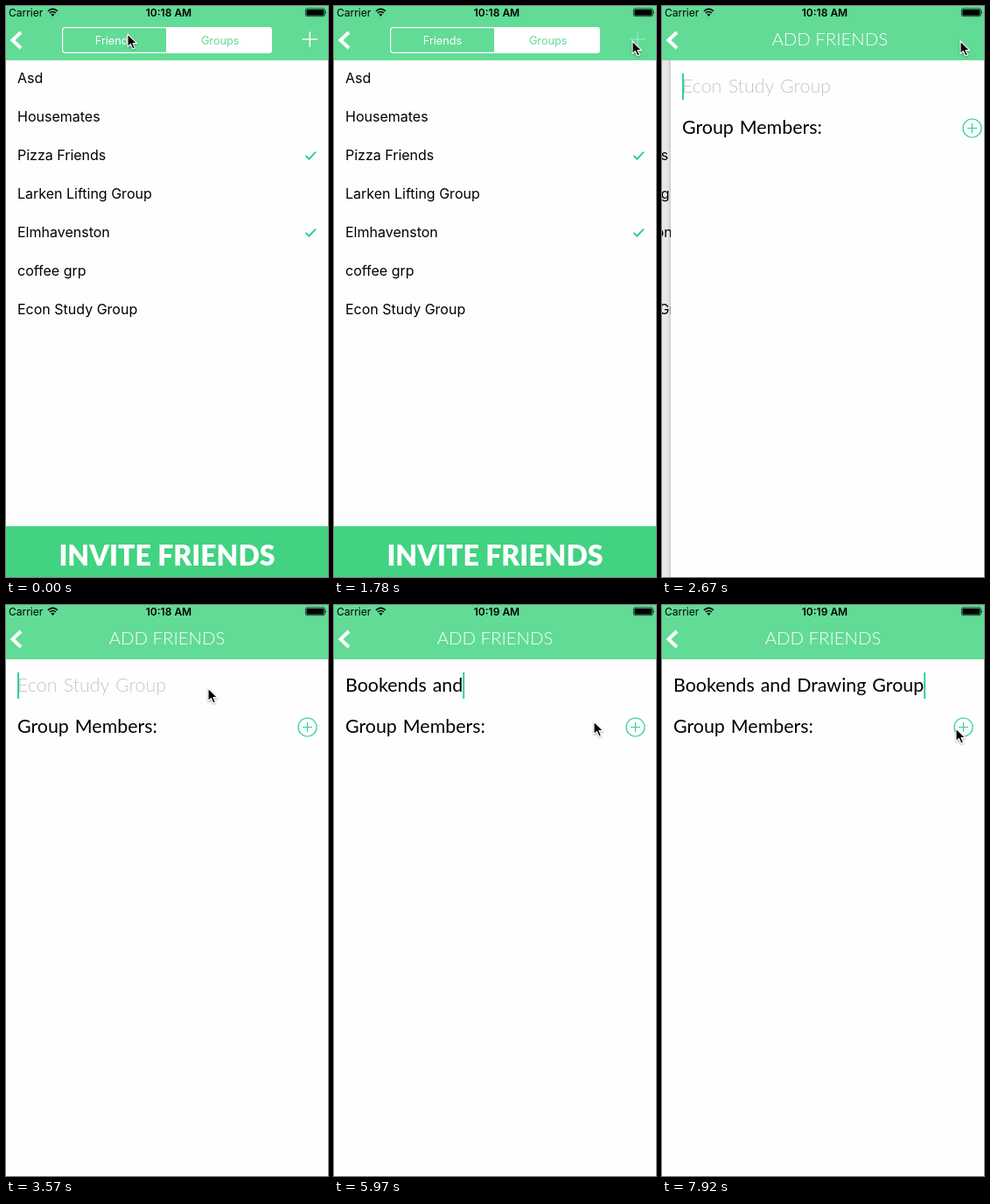
Recreate the animation shown at these times as an HTML page. Size 368 px wide and 652 px high, loop 8000 ms.

```html
<!DOCTYPE html>
<html lang="en">
<head>
<meta charset="utf-8">
<title>Groups</title>
<style>
  html, body { margin: 0; width: 100%; height: 100%; overflow: hidden; background: #fefefe; }
  svg { display: block; width: 100vw; height: 100vh; }
  text { white-space: pre; }
  .ui { font-family: Inter, Roboto, sans-serif; }
  .form { font: 21.4px Lato, sans-serif; word-spacing: 1.5px; }
  .row { font-size: 16px; }
  .small { font-size: 12.7px; text-anchor: middle; }
  .line { fill: none; stroke: #fff; }
  .teal { fill: none; stroke: #2fcf9b; }
</style>
</head>
<body>
<svg viewBox="0 0 368 652" preserveAspectRatio="none">
  <defs>
    <linearGradient id="edge">
      <stop offset="0" stop-color="#000" stop-opacity="0"/>
      <stop offset="1" stop-color="#000" stop-opacity=".12"/>
    </linearGradient>
  </defs>
  <rect width="368" height="652" fill="#fefefe"/>

  <g id="lists" class="ui row">
    <g id="groups"></g>
    <g id="friends"></g>
  </g>
  <rect id="dim" width="368" height="652"/>

  <g id="page">
    <rect x="-4" width="4" height="652" fill="url(#edge)"/>
    <rect width="368" height="652" fill="#fefefe"/>
    <text id="hint" class="form" x="13" y="99" fill="#c6c6cb" style="font-weight:300">Econ Study Group</text>
    <text id="field" class="form" x="13" y="99"></text>
    <rect id="caret" y="77" width="2" height="30" fill="#2fcf9b"/>
    <text class="form" x="13" y="146">Group Members:</text>
    <g class="teal" stroke-width="1.2">
      <circle cx="344.5" cy="139.5" r="10.5"/>
      <path d="M339 139.5h11M344.5 134v11"/>
    </g>
  </g>

  <g id="bar">
    <rect y="594" width="368" height="58" fill="#41d282"/>
    <text x="184" y="639" fill="#fff" text-anchor="middle" style="font:900 32px Lato,sans-serif">INVITE FRIENDS</text>
  </g>

  <rect width="368" height="62" fill="#62db96"/>
  <path class="line" d="M17 30L7.5 39L17 48" stroke-width="4"/>
  <g id="tabs" class="ui small">
    <rect id="press" y="24.5" width="120" height="29" rx="3" fill="#fff" opacity=".2"/>
    <path id="chosen" fill="#fff"/>
    <rect class="line" x="64.6" y="24.6" width="238.8" height="28.8" rx="3.5" stroke-width="1.2"/>
    <text id="tabA" x="124" y="43.5">Friends</text>
    <text id="tabB" x="244.7" y="43.5">Groups</text>
  </g>
  <path id="plus" class="line" d="M338.5 38h17.5M347.3 29.2v17.6" stroke-width="1.5"/>
  <text id="title" x="184" y="45" fill="#fff" text-anchor="middle" style="font:300 20.4px Lato,sans-serif">ADD FRIENDS</text>

  <g class="ui">
    <text x="3" y="11.5" font-size="12">Carrier</text>
    <text id="clock" x="186" y="11.5" font-size="12" font-weight="600" text-anchor="middle"></text>
    <g fill="none" stroke="#000" stroke-width="1.6">
      <path d="M47.9 5.9Q53.4 1 58.9 5.9M49.8 8Q53.4 5 57 8"/>
    </g>
    <path d="M51.3 9.6Q53.4 8 55.5 9.6L53.4 11.9z"/>
    <rect x="342.4" y="2.9" width="22" height="8.8" rx="1.8" fill="none" stroke="#000" stroke-width=".7"/>
    <rect x="343.4" y="3.9" width="20" height="6.8" rx="1"/>
    <path d="M365.3 5.6q1.5 1.7 0 3.4z"/>
  </g>

  <path id="cursor" d="M0 0V14.6L3.4 11.5L5.8 17L8.3 15.9L6 10.6H10.6z" stroke="#fff" stroke-width="1.1" stroke-linejoin="round" style="filter:drop-shadow(0 1px 1px rgba(0,0,0,.35))"/>
</svg>

<script>
const LOOP = 8000;
const GREEN = '#62db96';
const NAME = 'Bookends and Drawing Group';
const $ = id => document.getElementById(id);
const set = (id, attrs) => {
  for (const key in attrs) $(id).setAttribute(key, attrs[key]);
};
const move = (id, x, y = 0) => set(id, { transform: `translate(${x} ${y})` });
const show = (id, on) => set(id, { visibility: on ? 'visible' : 'hidden' });
const write = (id, text) => {
  if ($(id).textContent !== text) $(id).textContent = text;
};

const rows = (names, checked = []) => names.map((name, i) => {
  const y = 88 + 44 * i;
  const tick = `<path class="teal" stroke-width="2" d="M342.5 ${y - 17}l3.8 3.8l7.7-8.2" transform="translate(0 12)"/>`;
  return `<text x="13" y="${y}">${name}</text>` + (checked.includes(i) ? tick : '');
}).join('');

$('groups').innerHTML = rows(['Asd', 'Housemates', 'Pizza Friends', 'Larken Lifting Group',
  'Elmhavenston', 'coffee grp', 'Econ Study Group'], [2, 4]);
$('friends').innerHTML = rows(['TamsinOrrel', 'test', 'jody', 'Theo Karavelis', 'bramley472',
  'marnie', 'Joy Penny', 'Gideon', 'corbinlathey']);

// Keys are [step, value, ...]; the screen refreshes in steps of about 150 ms.
const POINTER = [[0, 139, 32], [2, 139, 32], [7, 204, 32], [8, 204, 32], [10, 341, 40],
  [18, 341, 40], [22, 231, 95], [26, 231, 95], [30, 297, 133], [51, 297, 133], [53, 336, 141]];
const TYPING = [[30, 0], [33, 3], [38, 11], [39, 11], [40, 12], [43, 16], [44, 16], [50, 26]];

const stepTime = k => 150 * k - 10 * ((k >= 5) + (k >= 10) + (k >= 20));
const stepAt = t => {
  let k = Math.floor(t / 150);
  while (stepTime(k + 1) <= t) k++;
  return k;
};
const smooth = u => u * u * (3 - 2 * u);

function track(keys, k, ease = u => u) {
  if (k <= keys[0][0]) return keys[0].slice(1);
  const i = keys.findIndex(key => key[0] >= k);
  if (i < 0) return keys[keys.length - 1].slice(1);
  const [a, b] = [keys[i - 1], keys[i]];
  const u = ease((k - a[0]) / (b[0] - a[0]));
  return a.slice(1).map((v, j) => v + (b[j + 1] - v) * u);
}

// Critically damped spring of the page push
function push(ms) {
  if (ms <= 0) return 0;
  const w = 0.01826 * ms;
  const p = 1 - (1 + w) * Math.exp(-w);
  return p > 0.99 ? 1 : p;
}

function drawTabs(k) {
  const friends = k >= 2 && k < 9;
  show('friends', friends);
  show('groups', !friends);
  set('chosen', { d: friends ? 'M184 24H68q-4 0-4 4v22q0 4 4 4h116z' : 'M183 24h117q4 0 4 4v22q0 4-4 4H183z' });
  set('tabA', { fill: friends ? GREEN : '#fff' });
  set('tabB', { fill: friends ? '#fff' : GREEN });
  set('press', { x: k === 1 ? 64 : 184, display: k === 1 || k === 8 ? 'inline' : 'none' });
}

function render(t) {
  const k = stepAt(t);
  const p = push(stepTime(k) - 2230);
  const left = 1 - p;

  drawTabs(k);
  move('lists', -110 * p);
  set('dim', { opacity: 0.09 * p });
  move('page', 368 * left);
  show('page', p > 0);
  move('bar', 0, p < 1 ? 61 * p : 60);
  move('tabs', -37 * p);
  set('tabs', { opacity: p ? left * 0.7 : 1 });
  set('plus', { opacity: p ? left * 0.6 : k >= 12 && k < 15 ? 0.3 : 1 });
  move('title', 288 * left);
  set('title', { opacity: 1 - left * left });

  const count = Math.round(track(TYPING, k)[0]);
  write('field', NAME.slice(0, count));
  show('hint', p > 0 && !count);
  const blinkOff = (k >= 21 && k < 24) || (k >= 27 && k < 30);
  show('caret', p > 0 && !blinkOff);
  set('caret', { x: 13 + (count ? $('field').getComputedTextLength() : 0) });

  write('clock', k < 29 ? '10:18 AM' : '10:19 AM');
  move('cursor', ...track(POINTER, k, smooth));
}

const start = performance.now();
function frame() {
  render((performance.now() - start) % LOOP);
  requestAnimationFrame(frame);
}
frame();
</script>
</body>
</html>
```
